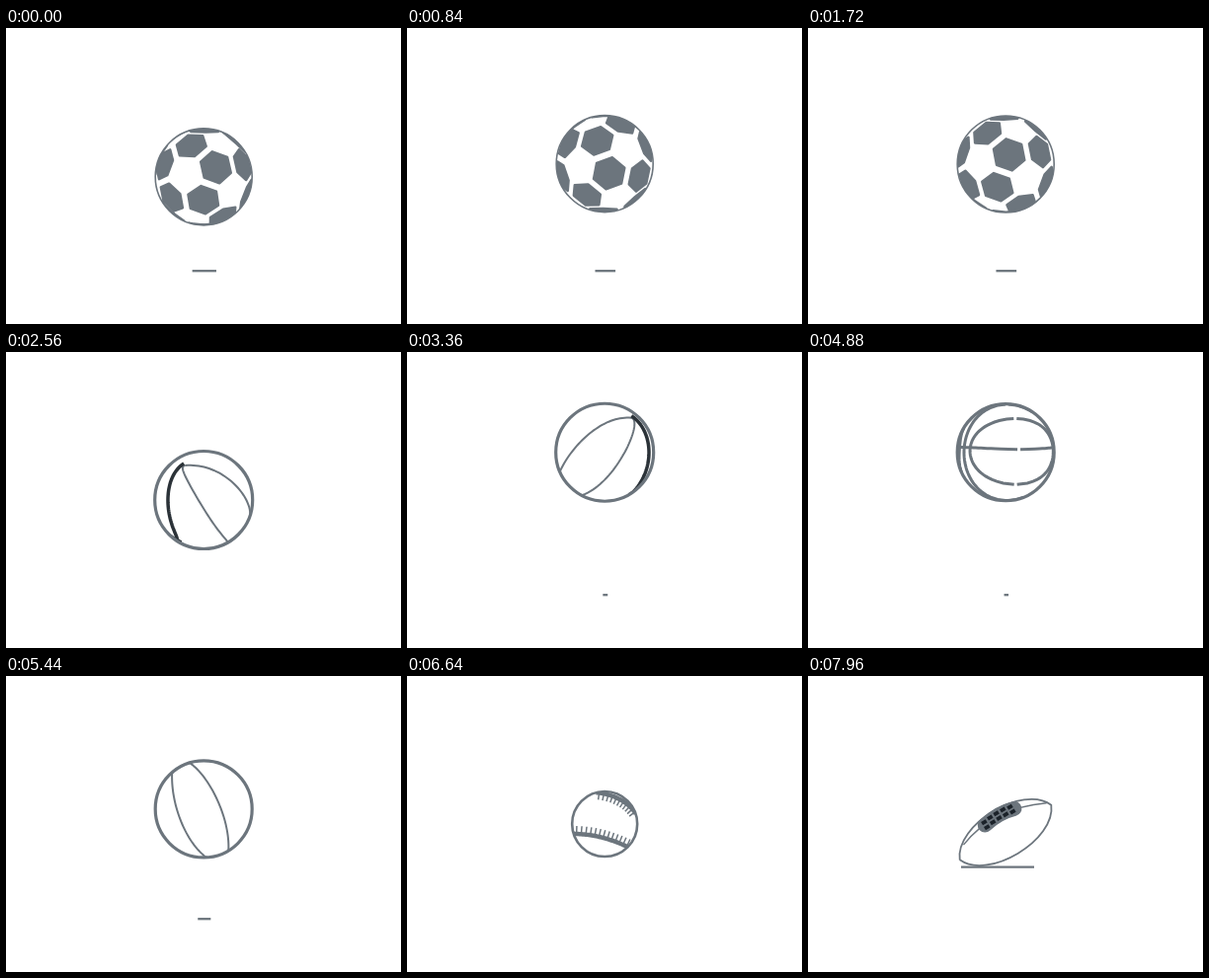
These frames come from a looping animation (400 by 300 pixels, 8 s). An HTML page with a canvas:

```html
<!DOCTYPE html>
<html lang="en">
<head>
<meta charset="utf-8">
<title>Bouncing balls</title>
<style>
  html, body { margin: 0; width: 100%; height: 100%; overflow: hidden; background: #fff; }
  canvas { display: block; width: 400px; height: 300px; }
</style>
</head>
<body>
<canvas id="stage" width="400" height="300"></canvas>
<script>
const ctx = document.getElementById('stage').getContext('2d');
const LOOP = 8000, INK = '#6c757d', DARK = '#2b3238';
const CX = 200, REST = 150, FLOOR = 196, GROUND = 246.2;
const SPIN = 349.5 / 1720 * Math.PI / 180;
const EYE = 12; // viewing distance in ball radii

// ---- vectors ----
const dot = (a, b) => a[0] * b[0] + a[1] * b[1] + a[2] * b[2];
const scale = (a, k) => a.map(v => v * k);
const add = (a, b) => a.map((v, i) => v + b[i]);
const unit = a => scale(a, 1 / Math.hypot(...a));
const cross = (a, b) => [
  a[1] * b[2] - a[2] * b[1], a[2] * b[0] - a[0] * b[2], a[0] * b[1] - a[1] * b[0]];
const frame = (a, b) => {
  const z = unit(a), x = unit(add(b, scale(z, -dot(z, b))));
  return [x, cross(z, x), z];
};
const turn = ([x, y, z], a) => {
  const c = Math.cos(a), s = Math.sin(a);
  return [x * c + z * s, y, z * c - x * s];
};

// ---- soccer: hexagonal patches around the corners of a dodecahedron ----
function soccerPatches() {
  const phi = (1 + Math.sqrt(5)) / 2, corners = [];
  for (const i of [-1, 1]) for (const j of [-1, 1]) {
    corners.push([i, j, -1], [i, j, 1]);
    const p = [0, i / phi, j * phi];
    for (let k = 0; k < 3; k++) corners.push([p[k], p[(k + 1) % 3], p[(k + 2) % 3]]);
  }
  const from = frame([1, 1, 1], [0, 1 / phi, phi]);
  const to = frame([12, -9.5, 47], [0, 22, 44]);
  const pts = corners.map(c => to.reduce(
    (sum, axis, i) => add(sum, scale(axis, dot(from[i], unit(c)))), [0, 0, 0]));
  return pts.map(p => {
    const near = pts.find(q => q !== p && dot(p, q) > 0.7);
    const [x, y] = frame(p, near);
    const patch = [];
    for (let i = 0; i < 6; i++) {
      const a = (i + 0.5) * Math.PI / 3, r = 0.315;
      patch.push(unit(add(scale(p, 0.949),
        add(scale(x, r * Math.cos(a)), scale(y, r * Math.sin(a))))));
    }
    return patch;
  });
}

// ---- seams: flat curves lifted onto the sphere ----
function bezier(c, t) {
  const u = 1 - t, w = [u * u * u, 3 * u * u * t, 3 * u * t * t, t * t * t];
  return [0, 1].map(k => w.reduce((s, v, i) => s + v * c[2 * i + k], 0));
}
function lift([x, y], r) {
  const k = Math.max(r, Math.hypot(x, y) * 1.0005);
  x /= k; y /= k;
  return [x, y, Math.sqrt(1 - x * x - y * y)];
}
function seam(c, r, width = 2, color = INK) {
  const pts = [];
  for (let i = 0; i <= 40; i++) pts.push(lift(bezier(c, i / 40), r));
  return { pts, width, color };
}
function stitches(c, r, count, length, side) {
  const out = [];
  for (let i = 0; i < count; i++) {
    const t = (i + 0.7) / (count + 0.4);
    const p = bezier(c, t), q = bezier(c, t + 0.01);
    const dx = q[0] - p[0], dy = q[1] - p[1], k = side * length / Math.hypot(dx, dy);
    out.push({ pts: [lift(p, r), lift([p[0] - dy * k, p[1] + dx * k], r)], width: 1.5, color: INK });
  }
  return out;
}

const lowSeam = [-32, 10, -10, 10, 8, 16, 25, 24];
const highSeam = [-9, -32, 10, -30, 24, -22, 32, -10];

const soccer = { r: 49, rim: 1.6, patches: soccerPatches(), at: 0 };
const lobe = { r: 49.5, rim: 3.2, at: 3360, seams: [
  seam([-46, 21, -36, -4, -4, -38, 27, -35], 49.5),
  seam([27, -35, 40, -32, 10, 34, -25, 44], 49.5),
  seam([27, -37, 50, -22, 52, 20, 25, 44], 49.5, 3.5, DARK)] };
const basket = { r: 49, rim: 3.2, at: 4360, seams: [
  seam([-50, -3, -20, -6, 20, -6, 50, -2], 49, 3),
  seam([-5, -50, -15, -20, -15, 20, -4, 50], 49, 3),
  seam([-36, -35, -17, -16, -17, 10, -37, 33], 49, 3),
  seam([32, -38, -12, -16, -12, 8, 34, 37], 49, 3)] };
const band = { r: 49, rim: 3.2, at: 5440, seams: [
  seam([-32, -38, -34, -5, -18, 35, 4, 50], 49),
  seam([-16, -48, 4, -36, 27, 8, 25, 43], 49)] };
const baseball = { r: 33, rim: 2.6, at: 6640, seams: [
  seam(lowSeam, 33, 4.5), seam(highSeam, 33, 4.5),
  ...stitches(lowSeam, 33, 13, 8, -1), ...stitches(highSeam, 33, 11, 7, 1)] };

// The far half of each seam mirrors the near half.
function drawSeams(seams, angle, r) {
  for (const { pts, width, color } of seams) for (const side of [1, -1]) {
    ctx.beginPath();
    let pen = false;
    for (const [px, py, pz] of pts) {
      const [x, y, z] = turn([px, py, pz * side], angle);
      if (z <= 0) { pen = false; continue; }
      pen ? ctx.lineTo(x * r, y * r) : ctx.moveTo(x * r, y * r);
      pen = true;
    }
    ctx.lineWidth = width;
    ctx.strokeStyle = color;
    ctx.stroke();
  }
}

function drawPatches(patches, angle, r) {
  const focal = Math.sqrt(EYE * EYE - 1), limb = 1 / EYE;
  ctx.fillStyle = ctx.strokeStyle = INK;
  ctx.lineWidth = 2.4;
  ctx.lineJoin = 'round';
  for (const patch of patches) {
    const pts = patch.map(p => turn(p, angle));
    if (!pts.some(p => p[2] > limb)) continue;
    ctx.beginPath();
    for (const [x, y, z] of pts) {
      const k = z < limb ? r / Math.hypot(x, y) : r * focal / (EYE - z);
      ctx.lineTo(x * k, y * k);
    }
    ctx.closePath();
    ctx.fill();
    ctx.stroke();
  }
}

function drawBall(ball, t, y, squash) {
  const { r, rim } = ball, angle = (t - ball.at) * SPIN;
  ctx.save();
  ctx.translate(CX + 0.2, y + r * squash);
  ctx.scale(1 + squash, 1 - squash);
  ctx.beginPath();
  ctx.arc(0, 0, r, 0, 7);
  ctx.fillStyle = '#fff';
  ctx.fill();
  ctx.save();
  ctx.clip();
  if (ball.patches) drawPatches(ball.patches, angle, r);
  else drawSeams(ball.seams, angle, r);
  ctx.restore();
  ctx.beginPath();
  ctx.arc(0, 0, r, 0, 7);
  ctx.lineWidth = rim;
  ctx.strokeStyle = INK;
  ctx.stroke();
  ctx.restore();
}

// ---- motion ----
function bounce(t, apex, period, top) {
  const u = (((t - apex) / period) % 1 + 1) % 1;
  const falling = u < 0.5, f = falling ? 2 * u : 2 - 2 * u;
  return {
    y: top + (FLOOR - top) * f ** 2.35,
    squash: 0.115 * Math.max(0, (f - 0.87) / 0.13),
    shadow: 4.5 + 31 * f ** (falling ? 1.7 : 2.9)
  };
}

function line(x1, x2, y) {
  ctx.lineWidth = 2.3;
  ctx.strokeStyle = INK;
  ctx.beginPath();
  ctx.moveTo(x1, y);
  ctx.lineTo(x2, y);
  ctx.stroke();
}

function drawBounce(ball, t, move, start, end) {
  const held = t < start || t > end;
  const y = held ? REST : move.y;
  const fade = t > end ? Math.max(0, 1 - (t - end) / 120) : t < start ? 0 : 1;
  const w = (held ? 24 : move.shadow) * fade;
  if (w > 0) line(CX + 0.8 - w / 2, CX + 0.8 + w / 2, GROUND);
  drawBall(ball, t, y, held ? 0 : move.squash);
}

// ---- football ----
const hull = [-54, 0, -40, -33, 40, -33, 54, 0];

// Half the height of the tilted outline.
function reach(tilt) {
  let best = 0;
  for (let i = 0; i <= 40; i++) {
    const [x, y] = bezier(hull, i / 40);
    best = Math.max(best, Math.abs(x * Math.sin(tilt)) + Math.abs(y * Math.cos(tilt)));
  }
  return best;
}

function drawFootball(t) {
  const p = Math.min(1, (t - 7600) / 360);
  const tilt = (-90 + 59 * p * p * (3 - 2 * p)) * Math.PI / 180;
  const w = 37 * Math.min(1, p * 3);
  line(192 - w, 192 + w, 193.6);
  ctx.save();
  ctx.translate(CX, 192 - reach(tilt));
  ctx.rotate(tilt);
  ctx.beginPath();
  ctx.moveTo(-54, 0);
  ctx.bezierCurveTo(...hull.slice(2));
  ctx.bezierCurveTo(40, 33, -40, 33, -54, 0);
  ctx.fillStyle = '#fff';
  ctx.fill();
  ctx.lineWidth = 1.8;
  ctx.lineJoin = 'round';
  ctx.stroke();
  ctx.lineWidth = 1.4;
  ctx.beginPath();
  ctx.moveTo(-43, -11);
  ctx.quadraticCurveTo(2, -28, 51, -4);
  ctx.stroke();
  ctx.lineCap = 'round';
  ctx.lineWidth = 15;
  ctx.beginPath();
  ctx.moveTo(-14, -17);
  ctx.quadraticCurveTo(4, -21, 20, -16);
  ctx.stroke();
  ctx.fillStyle = '#1b2229';
  for (let i = 0; i < 5; i++) for (const dy of [-4.6, 1])
    ctx.fillRect(-16 + i * 7.6, -18.7 + dy + 0.4 * (i - 2) ** 2, 5.4, 3.8);
  ctx.restore();
}

function draw(now) {
  const t = now % LOOP;
  ctx.fillStyle = '#fff';
  ctx.fillRect(0, 0, 400, 300);
  if (t < 2540) {
    drawBounce(soccer, t, bounce(t, -337, 879, 98), 0, 1758);
  } else if (t < 6600) {
    const ball = t < 3724 ? lobe : t < 5300 ? basket : band;
    drawBounce(ball, t, bounce(t, 3330, 788, 101.5), 3032, 5991);
  } else if (t < 7600) {
    drawBall(baseball, t, REST, 0);
  } else {
    drawFootball(t);
  }
}

const begin = performance.now();
function tick() {
  draw(performance.now() - begin);
  requestAnimationFrame(tick);
}
tick();
</script>
</body>
</html>
```
